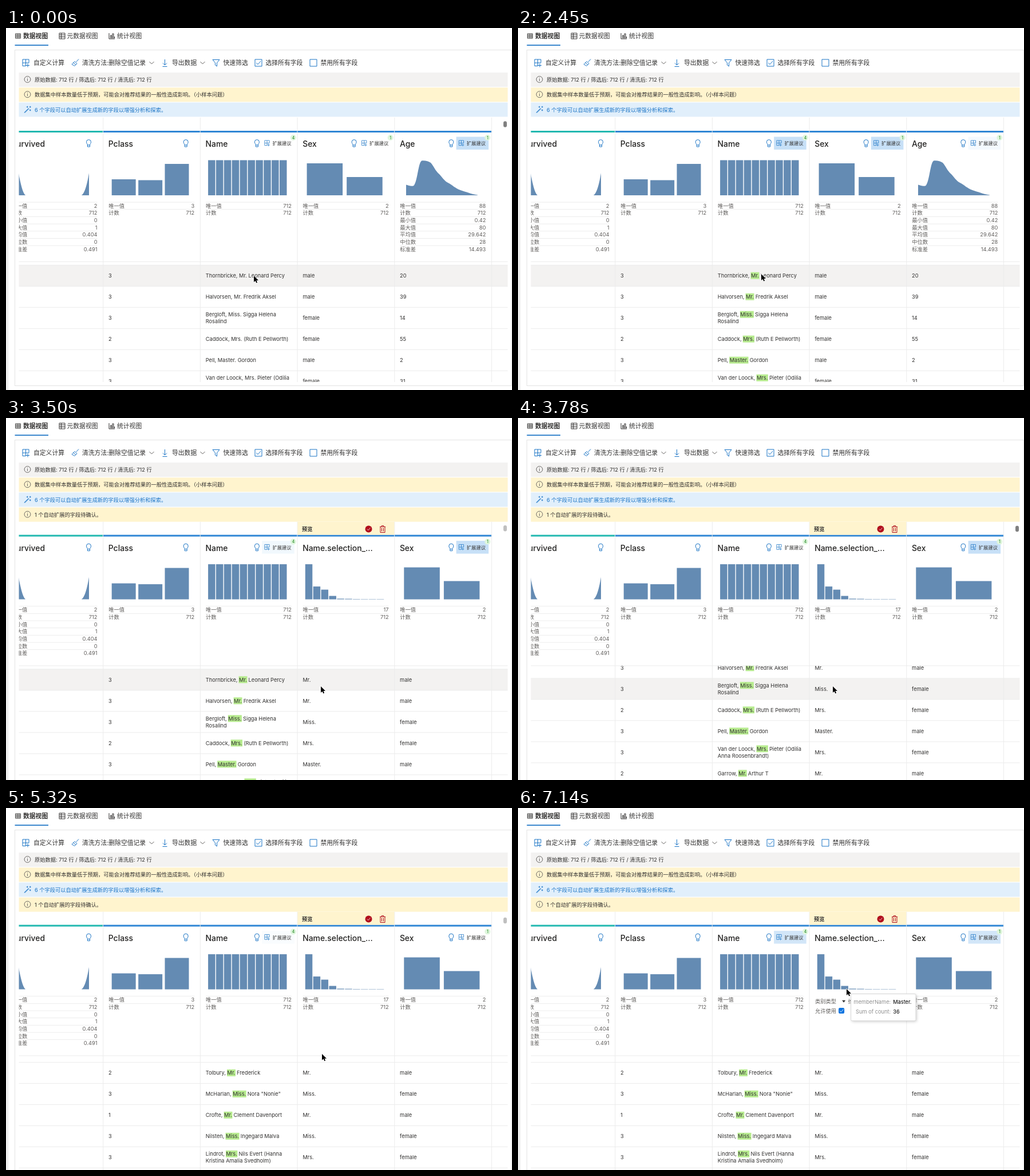
An HTML page with a canvas for the animation above (7.21 s loop, 884 px wide and 634 px high).

```html
<!DOCTYPE html>
<html lang="zh">
<head>
<meta charset="utf-8">
<style>
html, body { margin: 0; width: 100%; height: 100%; overflow: hidden; background: #fff; }
canvas { display: block; }
</style>
</head>
<body>
<canvas id="stage" width="884" height="634"></canvas>
<script>
const ctx = document.getElementById('stage').getContext('2d');
const LOOP = 7210, STEP = 70, SWITCH = 2590, MARK = 2240, READY = 2940;
const INK = '#323130', GRAY = '#605e5c', BLUE = '#1b74c5', BAR = '#648bb3', LINE = '#ececec';
const SHIFT = 24.6, ROW = 37, SIZE = 9.25;

const ICON = {
  grid: 'M-6-6H5V0H-6ZM-6 0V5.5H-.5V-6M3 1.5V7.5M0 4.5H6',
  broom: 'M6-6.5L1.5-1.5M-1-2.5L3 1.5L-1.5 5.5L-6 2.5ZM-3.5-.5L1 3.5',
  down: 'M0-6V4M-3.5 .5L0 4L3.5 .5M-4 6.5H4',
  filter: 'M-6-5.5H6L1.5 0V6L-1.5 4V0Z',
  chevron: 'M-4-2L0 2L4-2',
  box: 'M-6-6H6V6H-6Z',
  check: 'M-3.5 0L-1 2.8L4-3',
  info: 'M5.7 0A5.7 5.7 0 1 1-5.7 0A5.7 5.7 0 1 1 5.7 0M0-1V3M0-3.2V-2.2',
  wand: 'M-6 6L2-2M-5 6.5L3-1.5M0-6V-3M-2-4.5H1M5-6V-3M3.5-4.5H6.5M5 0V3M3.5 1.5H6.5',
  bulb: 'M-2 3C-2 1-4 .5-4-2.4A4 4 0 0 1 4-2.4C4 .5 2 1 2 3ZM-2 3V6H2V3',
  trash: 'M-5-4H5M-4-4V6H4V-4M-1.7-4V-6H1.7V-4M-1.5-2V4M1.5-2V4',
  table: 'M-5-4.5H5V4.5H-5ZM-5-1.5H5M-5 1.5H5M-1.5-4.5V4.5M2-4.5V4.5',
  sheet: 'M-5-5H5V5H-5ZM-5-2H5M-5 1.5H5M-1.5-5V5',
  stats: 'M-5-5V5H5M-2.5 4V-1H-.5V4M1 4V-4H3V4M4.5 4V1'
};

// Passenger rows: class, sex, age, name lines
const rows = [
  [3, 'male', 20, 'Thornbricke, Mr. Leonard Percy'],
  [3, 'male', 39, 'Halvorsen, Mr. Fredrik Aksel'],
  [3, 'female', 14, 'Bergloft, Miss. Sigga Helena', 'Rosalind'],
  [2, 'female', 55, 'Caddock, Mrs. (Ruth E Pellworth)'],
  [3, 'male', 2, 'Pell, Master. Gordon'],
  [3, 'female', 31, 'Van der Loock, Mrs. Pieter (Odilia', 'Anna Roosenbrandt)'],
  [2, 'male', '', 'Garrow, Mr. Arthur T'],
  [2, 'male', '', 'Tolbury, Mr. Frederick'],
  [3, 'female', '', 'McHarlan, Miss. Nora "Nonie"'],
  [1, 'male', '', 'Crofte, Mr. Clement Davenport'],
  [3, 'female', '', 'Nilsten, Miss. Ingegard Malva'],
  [3, 'female', '', 'Lindrot, Mrs. Nils Evert (Hanna', 'Kristina Amalia Svedholm)']
].map(([pclass, sex, age, ...name]) => {
  const [before, title] = name[0].match(/^(.*?, )(\w+\.)/).slice(1);
  return { pclass, sex, age, name, before, title };
});

const labels = ['唯一值', '计数', '最小值', '最大值', '平均值', '中位数', '标准差'];
const groups = [['Mr.', 398], ['Miss.', 145], ['Mrs.', 105], ['Master.', 36]];

// Keyframes: [time, value...]
const cursorKeys = [[0, 433, 434], [400, 424, 435], [770, 408, 434], [1100, 398, 433], [1330, 411, 432],
  [1960, 425, 431], [2870, 425, 431], [3290, 550, 470], [5180, 550, 470], [5600, 556, 352],
  [5810, 548, 328], [6000, 543, 307], [6370, 543, 307], [6700, 556, 310], [7070, 574, 317]];
const scrollKeys = [[3500, 0], [3780, 58], [4130, 205], [4340, 205], [4550, 231.5], [4760, 253.5]];
const thumbKeys = [[300, 1], [600, 0], [3430, 0], [3570, 1], [5180, 1], [5460, 0]];
const namePulse = [[1250, 0], [1850, 1], [3060, 1], [3640, 0], [5250, 0], [5850, 1], [6860, 1], [7140, .8]];
const agePulse = [[900, 1], [1900, .12], [2520, .2]];
const sexPulse = [[2590, .3], [2660, .5], [3080, 1], [4340, 1], [4550, .8], [5000, 0], [6400, 0], [7140, .8]];

function at(t, keys) {
  const i = keys.findIndex(k => k[0] > t);
  if (i < 0) return keys[keys.length - 1].slice(1);
  if (!i) return keys[0].slice(1);
  const a = keys[i - 1], b = keys[i], p = (t - a[0]) / (b[0] - a[0]);
  return a.slice(1).map((v, j) => v + (b[j + 1] - v) * p);
}

function setFont(size, weight) {
  ctx.font = `${weight} ${size}px Inter, "Noto Sans CJK SC", "Noto Sans CJK", sans-serif`;
}
function text(s, x, y, { size = SIZE, color = INK, weight = 400, align = 'left' } = {}) {
  setFont(size, weight);
  ctx.fillStyle = color;
  ctx.textAlign = align;
  ctx.fillText(s, x, y + size * .37);
}
function width(s) {
  setFont(SIZE, 400);
  return ctx.measureText(s).width;
}
function rect(x, y, w, h, color) {
  ctx.fillStyle = color;
  ctx.fillRect(x, y, w, h);
}
function round(x, y, w, h, r, color) {
  ctx.fillStyle = color;
  ctx.beginPath();
  ctx.roundRect(x, y, w, h, r);
  ctx.fill();
}
function icon(name, x, y, color = BLUE, scale = 1) {
  ctx.save();
  ctx.translate(x, y);
  ctx.scale(scale, scale);
  ctx.strokeStyle = color;
  ctx.lineWidth = 1;
  ctx.stroke(new Path2D(ICON[name]));
  ctx.restore();
}
function shape(d, y) {
  ctx.save();
  ctx.translate(0, y);
  ctx.fillStyle = BAR;
  ctx.fill(new Path2D(d));
  ctx.restore();
}
function clipped(x, y, w, h, paint) {
  ctx.save();
  ctx.beginPath();
  ctx.rect(x, y, w, h);
  ctx.clip();
  paint();
  ctx.restore();
}

// Bars given as [left, width, height], standing on y = 293
const bars = (x, list) => list.forEach(([l, w, h]) => rect(x + l, 293 - h, w, h, BAR));
const evenBars = heights => heights.map((h, i) => [14.2 + i * 13.88, 12.5, h]);

const survived = {
  title: 'Survived', color: '#22b8b0', values: ['2', '712', '0', '1', '0.404', '0', '0.491'],
  chart: () => shape('M18 236C24 262 27 286 34 293H18ZM132 293C138 289 142 272 145 254V293Z', 0)
};
const pclass = {
  title: 'Pclass', values: ['3', '712'], cell: r => r.pclass,
  chart: x => bars(x, [[15.5, 42, 28], [62, 42, 26.5], [108.3, 42, 55]])
};
const name = {
  title: 'Name', values: ['712', '712'], badge: 4, pulse: namePulse,
  chart: x => bars(x, evenBars(Array(10).fill(61.5)))
};
const sex = {
  title: 'Sex', values: ['2', '712'], badge: 1, cell: r => r.sex,
  chart: x => bars(x, [[17, 62.5, 56], [86.6, 62.5, 32]])
};
const age = {
  title: 'Age', values: ['88', '712', '0.42', '80', '29.642', '28', '14.493'], badge: 1,
  pulse: agePulse, cell: r => r.age,
  chart: () => shape('M699 293V274.5C704 276 708 278 712.5 276C719 268 720 237 726 232.5C731 231.5 738 233 742 236' +
    'C748 243 750 250 757 256C762 261 765 267 772 271C780 275 785 281 794 284C804 287 813 291 824 292.5V293Z', 0)
};
const extracted = {
  title: 'Name.selection_...', plain: true, cell: r => r.title,
  chart: x => bars(x, evenBars([61.5, 22.5, 17, 6, 1.2, 1, .6, .5, .5, .5]))
};

function toolbar() {
  rect(0, 126, 4, 508, '#f0f0f0');
  rect(4, 128, 1, 506, '#f8f8f8');
  const tab = { size: 10.8 };
  icon('table', 21, 14, INK, .9);
  text('数据视图', 30, 14, { size: 10.8, weight: 600 });
  icon('sheet', 98, 14, INK);
  text('元数据视图', 106.5, 14, tab);
  icon('stats', 185, 14, INK);
  text('统计视图', 194, 14, tab);
  rect(15.5, 29.3, 58.5, 1.7, BLUE);

  [['grid', 35], ['broom', 121], ['down', 277.5], ['filter', 367], ['box', 441], ['check', 441], ['box', 537]]
    .forEach(([n, x]) => icon(n, x, 61));
  icon('chevron', 254.5, 61, GRAY);
  icon('chevron', 343.5, 61, GRAY);
  [['自定义计算', 48], ['清洗方法:删除空值记录', 133], ['导出数据', 290], ['快速筛选', 379.5],
    ['选择所有字段', 453.5], ['禁用所有字段', 549.5]].forEach(([s, x]) => text(s, x, 61, tab));
}

function banner(y, color, glyph, s, ink = INK) {
  rect(22.5, y, 854, 25, color);
  icon(glyph, 37.5, y + 12, ink === INK ? GRAY : ink, .95);
  text(s, 50, y + 12.7, { color: ink });
}

function stats(x, values) {
  values.forEach((v, i) => {
    const y = 311.2 + i * 12.67;
    rect(x + 10, y - 6.5, 150, .8, '#e8e8e8');
    text(labels[i], x + 10, y, { color: GRAY });
    text(v, x + 160, y, { color: GRAY, align: 'right' });
  });
}

function settings(x) {
  text('类别类型', x + 10.5, 313.6, { color: GRAY });
  shape('', 0);
  ctx.fillStyle = INK;
  ctx.fill(new Path2D(`M${x + 57.5} 312.2h6l-3 4Z`));
  text('维度', x + 68, 313.6, { color: GRAY });
  text('允许使用', x + 10.5, 330.8, { color: GRAY });
  round(x + 51.5, 325.5, 10, 10, 2, '#0b73e0');
  icon('check', x + 56.5, 330.5, '#fff', .85);
}

function header(col, x, t) {
  rect(x + .8, 180, 168.8, 3, col.color || '#2f86d4');
  text(col.title, x + 9.6, 203, { size: 13.9, weight: 500, color: '#242322' });
  if (!col.plain) icon('bulb', x + (col.badge ? 99.5 : 145), 202);
  if (col.badge) {
    const keys = col.pulse || (t < SWITCH ? namePulse : sexPulse);
    ctx.globalAlpha = at(t, keys)[0];
    rect(x + 108.3, 190.5, 56.5, 22.5, '#c7e0f7');
    ctx.globalAlpha = 1;
    icon('grid', x + 117.5, 201.5, BLUE, .75);
    text('扩展建议', x + 126.5, 202, { size: 8.3 });
    round(x + 158, 187, 10, 10, 5, '#dff6dd');
    text(col.badge, x + 163, 192, { size: 7, color: '#107c10', align: 'center' });
  }
  if (col !== extracted || t >= READY) col.chart(x);
  if (col !== extracted) stats(x, col.values);
  else if (t >= 5390) settings(x);
  else stats(x, t < READY ? ['0', ''] : ['17', '712']);
}

function nameCell(r, i, x, y, t) {
  const two = r.name.length > 1, top = two ? y - 6 : y;
  const left = x + width(r.before), w = width(r.title);
  if (t >= MARK) rect(left - .5, top - 6, w + 1, 12, '#b7eb8f');
  else if (!i && t > 1330) {
    const end = Math.min(at(t, cursorKeys)[0], left + w);
    rect(left, top - 6, Math.max(0, end - left), 12, '#b3d7fe');
  }
  text(r.name[0], x, top);
  if (two) text(r.name[1], x, y + 6);
}

function table(t, cols, shift, cursor, scroll) {
  const start = 415.3 + shift, xs = cols.map((c, i) => -.5 + i * 169.7);
  const bottom = shift ? 634 : 620;
  let hover = -1;
  if (t < SWITCH) hover = 0;
  else if (t > 3000 && t < 3900 && cursor[1] > start) hover = Math.floor((cursor[1] - start + scroll) / ROW);

  clipped(22.5, 409 + shift, 854, bottom - 409 - shift, () => {
    rows.forEach((r, i) => {
      const y = start + i * ROW - scroll, mid = y + 18.4;
      if (i === hover) rect(22, y, 855, ROW, '#f3f2f1');
      rect(22, y + ROW - .5, 855, 1, LINE);
      if (!i) rect(22, y - .5, 855, 1, LINE);
      cols.forEach((c, j) => {
        if (c === name) nameCell(r, i, xs[j] + 9.8, mid, t);
        else if (c.cell) text(c.cell(r), xs[j] + 9.8, mid);
      });
    });
  });
  clipped(22.5, 156 + shift, 854, bottom - 156 - shift, () => {
    rect(22, 408.8 + shift, 855, 1, LINE);
    xs.concat(848).forEach(x => rect(x, 157 + shift, 1, 480, LINE));
    ctx.save();
    ctx.translate(0, shift);
    cols.forEach((c, i) => header(c, xs[i], t));
    ctx.restore();
  });
  if (shift) {
    const x = xs[3];
    rect(x + .8, 182, 169, 22.6, '#fff4ce');
    text('预览', x + 8.5, 195, { weight: 700 });
    round(627.5, 188.5, 12, 12, 6, '#b10e1c');
    icon('check', 633.5, 194.5, '#fff', .75);
    icon('trash', 658, 194.5, '#b10e1c');
  }
}

function tooltip([cx, cy]) {
  const i = Math.max(0, Math.min(3, Math.floor((cx - 522.3) / 13.88)));
  const [label, count] = groups[i], x = cx + 7.7, y = cy + 8.7;
  ctx.save();
  ctx.shadowColor = 'rgba(0,0,0,.2)';
  ctx.shadowBlur = 5;
  ctx.shadowOffsetX = ctx.shadowOffsetY = 1.5;
  round(x, y, 81 + width(label), 47, 2, '#fff');
  ctx.restore();
  ctx.strokeStyle = '#d8d8d8';
  ctx.lineWidth = 1;
  ctx.stroke();
  [['memberName:', label], ['Sum of count:', count]].forEach(([k, v], j) => {
    const ty = y + 14.3 + j * 17;
    text(k, x + 69.5, ty, { color: '#8f8f8f', align: 'right' });
    text(v, x + 73.5, ty, { color: '#000' });
  });
}

function pointer([x, y]) {
  ctx.save();
  ctx.translate(x, y);
  const arrow = new Path2D('M0 0V11L2.6 8.7L4.3 12.5L6.1 11.7L4.5 8H8Z');
  ctx.strokeStyle = '#fff';
  ctx.lineWidth = 1.6;
  ctx.lineJoin = 'round';
  ctx.stroke(arrow);
  ctx.fillStyle = '#000';
  ctx.fill(arrow);
  ctx.restore();
}

function draw(now) {
  const t = Math.floor(now % LOOP / STEP) * STEP;
  const preview = t >= SWITCH, shift = preview ? SHIFT : 0;
  const cursor = at(t, cursorKeys), scroll = at(t, scrollKeys)[0];
  rect(0, 0, 884, 634, '#fff');
  ctx.strokeStyle = '#e3e3e3';
  ctx.lineWidth = 1;
  ctx.strokeRect(15.5, 38.5, 867.5, preview ? 620 : 588);
  toolbar();
  banner(78, '#f3f2f1', 'info', '原始数据: 712 行 / 筛选后: 712 行 / 清洗后: 712 行');
  banner(104.3, '#fff4ce', 'info', '数据集中样本数量低于预期，可能会对推荐结果的一般性造成影响。（小样本问题）');
  banner(130.5, '#e1effb', 'wand', '6 个字段可以自动扩展生成新的字段以增强分析和探索。', BLUE);
  if (preview) banner(156.7, '#fff4ce', 'info', '1 个自动扩展的字段待确认。');

  const cols = [survived, pclass, name].concat(preview ? [extracted, sex] : [sex, age]);
  table(t, cols, shift, cursor, scroll);

  ctx.globalAlpha = at(t, thumbKeys)[0];
  round(869, 163.3 + shift + scroll / 65, 6, 10.5, 3, '#808080');
  ctx.globalAlpha = 1;
  if (t >= 5910) tooltip(cursor);
  pointer(cursor);
}

const begin = performance.now();
(function frame() {
  draw(performance.now() - begin);
  requestAnimationFrame(frame);
})();
</script>
</body>
</html>
```
